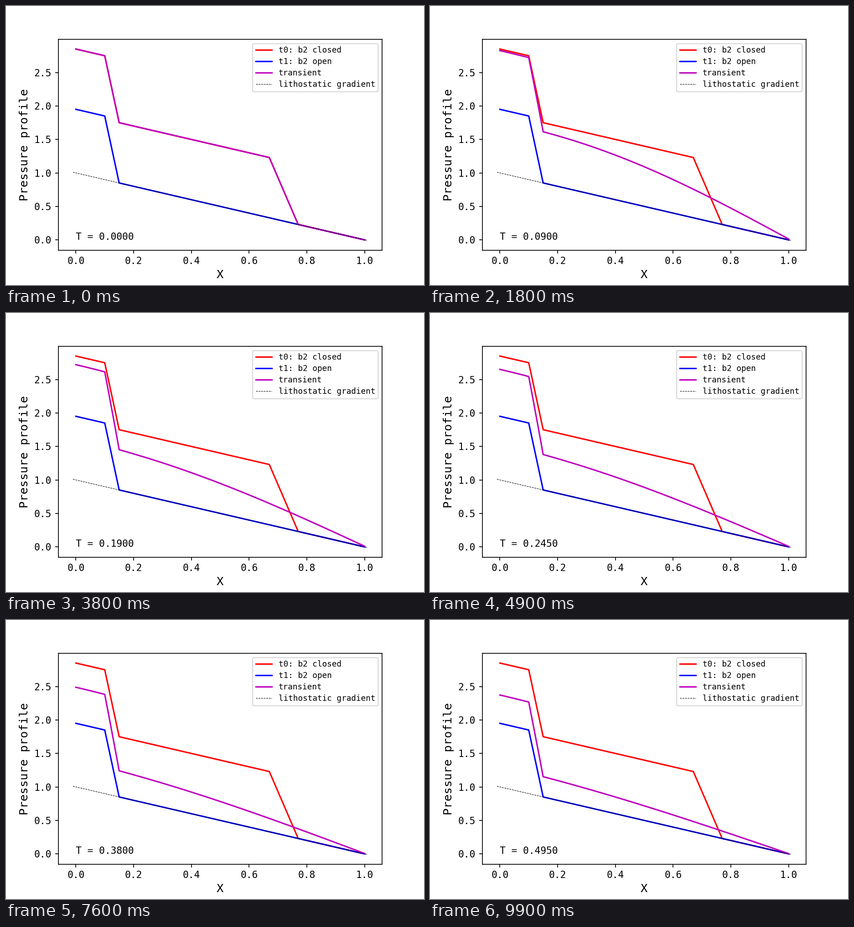
These frames come from a looping animation (917 by 611 pixels, 10000 ms). A matplotlib script:

```python
import numpy as np
import matplotlib.pyplot as plt
from matplotlib.animation import FuncAnimation
from matplotlib.patches import FancyBboxPatch

W, H, DPI = 917, 611, 152.8
FRAMES, INTERVAL, DT = 100, 100, 0.005
SMALL = 10 / 1.2  # legend font size in points

plt.rcParams.update({"font.family": "DejaVu Sans Mono", "font.size": 10})

# Pressure profiles: b1 spans 0.10-0.15, b2 spans 0.67-0.77
DX = 0.01
x = np.linspace(0, 1, 101)
closed = np.interp(x, [0, 0.1, 0.15, 0.67, 0.77, 1],
                   [2.85, 2.75, 1.75, 1.23, 0.23, 0])
opened = np.interp(x, [0, 0.1, 0.15, 1], [1.95, 1.85, 0.85, 0])

# Diffusion operator: sealed on the left, drained on the right
face = x + DX / 2
k = np.where((face > 0.1) & (face < 0.15), 0.05, 1.0) / DX**2
left = np.r_[0, k[:-1]]
op = np.diag(-(left + k)) + np.diag(k[:-1], 1) + np.diag(k[:-1], -1)
rate, modes = np.linalg.eigh(op)
weights = modes.T @ (closed - opened)


def profile(t):
    return opened + modes @ (np.exp(rate * t) * weights)


fig = plt.figure(figsize=((W + 0.01) / DPI, (H + 0.01) / DPI), dpi=DPI,
                 facecolor="white")
ax = fig.add_axes([0.125, 0.125, 0.775, 0.755])

styles = [
    ("t0: b2 closed", dict(color="r", lw=1.5)),
    ("t1: b2 open", dict(color="b", lw=1.5)),
    ("transient", dict(color="m", lw=1.5)),
    ("lithostatic gradient", dict(color="k", lw=0.5, ls="--")),
]
ends = np.array([-0.01, 1.01])
curves = [(x, closed), (x, opened), (x, closed), (ends, 1 - ends)]
lines = [ax.plot(*xy, **style)[0] for xy, (_, style) in zip(curves, styles)]
transient = lines[2]

ax.set_xlim(-0.061, 1.061)
ax.set_ylim(-0.153, 2.993)
ax.set_xlabel("X", fontsize=12, labelpad=3.4)
ax.set_ylabel("Pressure profile", fontsize=12)
clock = ax.text(0, 0, "T = 0.0000")

# Legend, laid out in pixels on a full-figure overlay
key = fig.add_axes([0, 0, 1, 1])
key.set_xlim(0, W)
key.set_ylim(H, 0)
key.axis("off")
key.add_patch(FancyBboxPatch(
    (541, 82.5), 275.5, 105.3, boxstyle="round,pad=0,rounding_size=3.5",
    facecolor="white", edgecolor="0.8", lw=1, alpha=0.8))
for row, (label, style) in enumerate(styles):
    y = 95.7 + 25 * row
    key.plot([548, 583.4], [y, y], **style)
    key.text(597.5, y + 6.2, label, fontsize=SMALL)


def update(i):
    t = i * DT
    transient.set_ydata(profile(t))
    clock.set_text(f"T = {t:.4f}")
    return transient, clock


anim = FuncAnimation(fig, update, frames=FRAMES, interval=INTERVAL,
                     repeat=True, repeat_delay=0)
plt.show()
```
